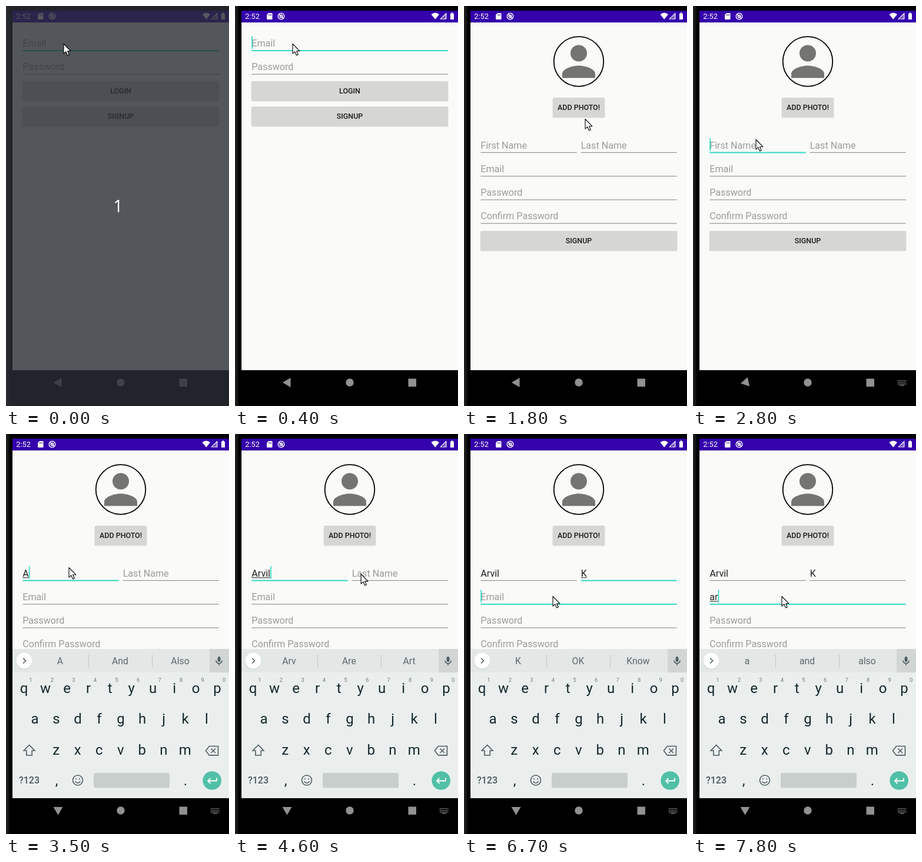
Animation of 379 by 681 pixels, one loop 8 s. Source, as an HTML page:

```html
<!DOCTYPE html>
<html lang="en">
<head>
<meta charset="utf-8">
<title>Sign-up form</title>
<style>
html, body { margin: 0; width: 100%; height: 100%; overflow: hidden; background: #000; }
svg { display: block; width: 379px; height: 681px; font-family: Roboto, "Noto Sans", sans-serif; }
.label { font-size: 12.5px; font-weight: 500; fill: #1b1c1b; text-anchor: middle; }
.field { font-size: 16.1px; }
.key { font-size: 24px; fill: #14282c; text-anchor: middle; }
.digit { font-size: 9.5px; fill: #6f7b7d; text-anchor: middle; }
.word { font-size: 15.8px; fill: #5c686b; text-anchor: middle; }
.line { fill: none; stroke: #4d5c60; stroke-width: 1.6; }
.tool { fill: none; stroke: #66716f; stroke-width: 1.6; }
</style>
</head>
<body>
<svg id="stage" viewBox="0 0 379 681">
  <defs>
    <clipPath id="screen"><rect x="11" y="8" width="368" height="673"/></clipPath>
    <clipPath id="body"><rect x="11" y="28" width="368" height="592"/></clipPath>
    <linearGradient id="edge"><stop offset="0" stop-color="#242424"/><stop offset="1" stop-color="#0b0b0b"/></linearGradient>
  </defs>
  <rect width="379" height="681"/>
  <rect width="6" height="681" fill="url(#edge)"/>
  <g clip-path="url(#screen)">
    <g id="login"></g>
    <g id="signup"></g>
  </g>
  <g clip-path="url(#body)"><g id="keyboard"></g></g>
  <g id="status" fill="#fff">
    <text x="17.3" y="22.3" font-size="12.8">2:52</text>
    <path d="M57 12h5.5q1 0 1 1v9q0 1-1 1h-7.500q-1 0-1-1v-7z"/>
    <path d="M57.500 14v2.500M59.500 14v2.500M61.500 14v2.500" stroke="#3401ac" stroke-width=".9"/>
    <g fill="none" stroke="#fff" stroke-width="1.4">
      <circle cx="78.500" cy="17.500" r="5.300"/><circle cx="78.500" cy="17.500" r="2.300"/><path d="M75 14l7 7"/>
    </g>
    <path d="M333.500 14.200Q340.300 9 347 14.200L340.300 22.800Z"/>
    <path d="M349.500 22L358.800 12.800V22Z" fill="none" stroke="#fff" stroke-width="1.2"/>
    <path d="M354 18.500L359.300 13V22.500H354Z" opacity=".35"/>
    <path d="M366 12.800h1.700v-1.500h2.600v1.500h1.700v10.200h-6z"/>
  </g>
  <g id="nav" fill="#909190">
    <path id="back" d="M80.800 641L94.500 633V649Z"/>
    <circle cx="195" cy="641" r="6.700"/>
    <rect x="294.500" y="634.500" width="13.500" height="13.500"/>
    <g id="switcher" stroke="#909190" stroke-width="1.6" stroke-dasharray="1.600 1.100">
      <path d="M348 637.800h14.500M348 640.700h14.500M348 643.600h14.500"/>
      <path d="M351.500 646h7.500" stroke-dasharray="none" stroke-width="1.200"/>
    </g>
  </g>
  <g id="pause">
    <rect width="379" height="681" fill="#2a2e35" opacity=".8"/>
    <text x="190.500" y="351" font-size="29.500" font-family="Open Sans, Noto Sans, sans-serif" fill="#fff" text-anchor="middle">1</text>
  </g>
  <path id="mouse" d="M0 0V16.600L3.800 13.200L6.500 19.400L9.200 18.200L6.600 12.200H11.800Z" fill="#fff" stroke="#000" stroke-width="1.100" stroke-linejoin="round"/>
</svg>
<script>
const LOOP = 8000, TEAL = '#2fd9c4', CENTER = [195, 344];
const $ = id => document.getElementById(id);

function add(parent, tag, attrs = {}, text) {
  const el = document.createElementNS('http://www.w3.org/2000/svg', tag);
  set(el, attrs);
  if (text !== undefined) el.textContent = text;
  return parent.appendChild(el);
}
function set(el, attrs) {
  for (const k in attrs) el.setAttribute(k, attrs[k]);
}
const show = (el, on) => el.setAttribute('display', on ? 'inline' : 'none');
const within = (t, a, b) => t >= a && t < b;

// Latest value of a list of [time, value] pairs
function at(t, list) {
  let v = list[0][1];
  for (const [start, value] of list) if (t >= start) v = value;
  return v;
}

function addWindow(g) {
  add(g, 'rect', { x: 11, y: 8, width: 368, height: 672, fill: '#fafaf8' });
  add(g, 'rect', { x: 11, y: 8, width: 368, height: 20, fill: '#3401ac' });
  add(g, 'rect', { x: 11, y: 620, width: 368, height: 61 });
}

function addButton(g, x, y, w, label) {
  add(g, 'rect', { x: x - .5, y: y + .5, width: w + 1, height: 34, rx: 2.500, fill: '#000', opacity: .13 });
  const face = add(g, 'rect', { x, y, width: w, height: 33, rx: 2, fill: '#d6d7d4' });
  add(g, 'text', { x: x + w / 2, y: y + 21, class: 'label' }, label);
  return face;
}

function addField(g, x, base, w, hint) {
  const text = add(g, 'text', { x, y: base, class: 'field' });
  const under = add(g, 'rect', { x, y: base + 1.700, height: 1, fill: '#222' });
  const line = add(g, 'rect', { x, width: w });
  const caret = add(g, 'rect', { y: base - 17.500, width: 1.700, height: 21.500, fill: TEAL });
  return (value, focus, blink, composing) => {
    text.textContent = value || hint;
    set(text, { fill: value ? '#202120' : '#9b9c9a' });
    const len = value ? text.getComputedTextLength() : 0;
    set(line, focus ? { y: base + 6, height: 2, fill: TEAL } : { y: base + 6.400, height: 1.100, fill: '#8d8e8c' });
    set(under, { width: len });
    set(caret, { x: x + len });
    show(under, value && composing);
    show(caret, blink);
  };
}

// Login window
const login = $('login');
addWindow(login);
const loginMail = addField(login, 28.300, 69, 333.500, 'Email');
addField(login, 28.300, 109.200, 333.500, 'Password')('', false, false);
addButton(login, 28, 128, 334, 'LOGIN');
const signupFace = addButton(login, 28, 171, 334, 'SIGNUP');

// Sign-up window
const signup = $('signup');
addWindow(signup);
add(signup, 'circle', { cx: 195, cy: 94.500, r: 42.300, fill: 'none', stroke: '#000', 'stroke-width': 1.800 });
add(signup, 'circle', { cx: 195, cy: 80.500, r: 14, fill: '#747473' });
add(signup, 'path', { d: 'M195 101.500c-9.300 0-28 4.700-28 14v7h56v-7c0-9.300-18.700-14-28-14z', fill: '#747473' });
addButton(signup, 151, 156, 88, 'ADD PHOTO!');
const first = addField(signup, 28.300, 242.500, 163.500, 'First Name');
const last = addField(signup, 198.700, 242.500, 163.100, 'Last Name');
const mail = addField(signup, 28.300, 282.800, 333.500, 'Email');
addField(signup, 28.300, 323, 333.500, 'Password')('', false, false);
addField(signup, 28.300, 363.200, 333.500, 'Confirm Password')('', false, false);
addButton(signup, 28, 383, 334, 'SIGNUP');

// Keyboard
const board = $('keyboard');
add(board, 'rect', { x: 11, y: 366, width: 368, height: 260, fill: '#eaefee' });
add(board, 'rect', { x: 11, y: 366, width: 368, height: 40, fill: '#e3e7e6' });
add(board, 'rect', { x: 346, y: 366, width: 33, height: 40, fill: '#d1d6d4' });
add(board, 'circle', { cx: 31, cy: 386.800, r: 13.800, fill: '#c9cecc' });
add(board, 'circle', { cx: 31, cy: 386, r: 13.500, fill: '#fff' });
const chevron = add(board, 'path', { d: 'M29 381.500l4.500 4.500-4.500 4.500', class: 'line' });
add(board, 'rect', { x: 359.700, y: 379, width: 4.800, height: 9, rx: 2.400, fill: '#4d5c60' });
add(board, 'path', { d: 'M357 385.500a5.100 5.100 0 0 0 10.200 0M362.100 390.500v3.500', class: 'line' });

const words = add(board, 'g');
for (const x of [140.500, 248.500]) add(words, 'path', { d: `M${x} 375.500v22`, stroke: '#c3c9c7' });
const slots = [92, 194, 296].map(x => add(words, 'text', { x, y: 392, class: 'word' }));

const tools = add(board, 'g');
add(tools, 'path', { d: 'M84 384.500a4.700 4.700 0 1 1-9.400 0a4.700 4.700 0 1 1 9.400 0M82.700 387.800l6 6', class: 'tool' });
add(tools, 'path', { d: 'M130.500 379.500h9q2 0 2 2v6l-5 5.500h-6q-2 0-2-2v-9.500q0-2 2-2M141.500 387.500h-5v5.500M131.500 386.500q2.500 3.500 5 1M132 383h1.500M137 383h1.500', class: 'tool' });
add(tools, 'text', { x: 188, y: 390, 'font-size': 11.500, 'font-weight': 700, fill: '#66716f', 'text-anchor': 'middle' }, 'GIF');
add(tools, 'rect', { x: 236.500, y: 379.500, width: 13.500, height: 13.500, rx: 1.500, fill: '#66716f' });
add(tools, 'path', { d: 'M276 376v20', stroke: '#c9cfcd' });
for (const x of [303.500, 309, 314.500]) add(tools, 'circle', { cx: x, cy: 386.300, r: 1.800, fill: '#66716f' });

const ROWS = [['qwertyuiop', 30.600, 440.500], ['asdfghjkl', 49, 493], ['zxcvbnm', 85.300, 545.700]];
function addLetters(upper) {
  const g = add(board, 'g');
  for (const [row, x, y] of ROWS) {
    [...row].forEach((c, i) => add(g, 'text', { x: x + i * 36.500, y: y + (upper ? 1.800 : 0), class: 'key' },
      upper ? c.toUpperCase() : c));
  }
  add(g, 'path', { d: 'M39.500 529.500l-9.300 9.500h4.600v8h9.400v-8h4.600z', class: 'line', style: upper ? 'fill:#4d5c60' : '' });
  return g;
}
const lower = addLetters(false), upper = addLetters(true);
[...'1234567890'].forEach((c, i) => add(board, 'text', { x: 41.800 + i * 36.550, y: 422, class: 'digit' }, c));
add(board, 'path', { d: 'M339.500 539.200l6-7.700h15v15.400h-15zM348.500 535.500l7.500 7.500M356 535.500l-7.500 7.500', class: 'line' });
add(board, 'text', { x: 39.500, y: 595.300, 'font-size': 16, 'font-weight': 500, fill: '#4a585c', 'text-anchor': 'middle' }, '?123');
add(board, 'text', { x: 86, y: 597.500, class: 'key' }, ',');
add(board, 'text', { x: 305, y: 597.500, class: 'key' }, '.');
add(board, 'circle', { cx: 122, cy: 589.500, r: 8.500, class: 'line' });
add(board, 'path', { d: 'M117.500 591.500q4.500 5.500 9 0M118.800 586.200v2M125.200 586.200v2', class: 'line' });
add(board, 'rect', { x: 149, y: 577, width: 129, height: 25.500, rx: 3, fill: '#c8cecc' });
add(board, 'circle', { cx: 350.200, cy: 590, r: 15.800, fill: '#50c0a6' });
add(board, 'path', { d: 'M358 585.500v5h-15M347.500 586l-4.500 4.500l4.500 4.500', fill: 'none', stroke: '#fff', 'stroke-width': 1.800 });

// Pointer moves: start, steps, x, y
const MOVES = [[0, 1, 98, 64.500], [600, 5, 206, 192.500], [2100, 3, 107, 227.500], [4400, 4, 234, 240.500], [6200, 4, 151, 276.500]];
function pointer(t) {
  let x = 98, y = 64.500;
  for (const [start, steps, tx, ty] of MOVES) {
    if (t < start) break;
    const k = Math.min(1, ((t - start) / 100 + 1) / steps), e = k * k * (3 - 2 * k);
    x += (tx - x) * e;
    y += (ty - y) * e;
  }
  return [x, y];
}

function zoom(el, s) {
  const [x, y] = CENTER;
  set(el, { transform: `translate(${x} ${y}) scale(${s}) translate(${-x} ${-y})` });
}

function drawWindows(t) {
  const p = t >= 1800 ? 1 : t >= 1500 ? 1 - .32 * Math.exp((1500 - t) / 80) : 0;
  show(login, t < 1800);
  show(signup, t >= 1500);
  zoom(login, 1 + .05 * p);
  zoom(signup, .85 + .15 * p);
  set(signup, { opacity: t < 1600 ? .72 : 1 });
  set(signupFace, { fill: within(t, 1300, 1500) ? '#c6c7c4' : '#d6d7d4' });
  loginMail('', true, within(t, 400, 900));
}

function drawFields(t) {
  first(at(t, [[0, ''], [3200, 'A'], [3700, 'Ar'], [3900, 'Arv'], [4400, 'Arvi'], [4500, 'Arvil']]),
    within(t, 2700, 5200), within(t, 2700, 5000), within(t, 3500, 5200));
  last(t < 6000 ? '' : 'K', within(t, 5200, 6900), within(t, 5200, 6500), within(t, 6000, 6900));
  mail(at(t, [[0, ''], [7400, 'a'], [7800, 'ar']]), t >= 6700, t >= 6700, true);
}

function drawKeyboard(t) {
  const slide = at(t, [[0, 260], [2900, 130], [3000, 36], [3100, 6], [3200, 0]]);
  show(board, t >= 2900);
  set(board, { transform: `translate(0 ${slide})` });
  const caps = t < 3200 || within(t, 5700, 6000);
  show(upper, caps);
  show(lower, !caps);
  const list = at(t, [[0, ''], [3500, 'A And Also'], [3800, 'Ar Are Art'], [3900, 'Arv Are Art'], [5300, ''],
    [6000, 'K OK Know'], [7000, ''], [7700, 'a and also']]);
  show(words, list);
  show(tools, !list);
  list.split(' ').forEach((w, i) => slots[i].textContent = w);
  set(chevron, { transform: list ? '' : 'rotate(180 31 386)' });
  const turn = at(t, [[0, 0], [2800, -12], [2900, -55], [3000, -82], [3100, -90]]);
  set($('back'), { transform: `rotate(${turn} 88.500 641)` });
  show($('switcher'), t >= 2800);
}

function draw(time) {
  const t = Math.floor(time / 100) * 100;
  drawWindows(t);
  drawFields(t);
  drawKeyboard(t);
  show($('pause'), t < 400);
  set($('mouse'), { transform: `translate(${pointer(t)})` });
}

function tick(now) {
  draw(now % LOOP);
  requestAnimationFrame(tick);
}
draw(0);
requestAnimationFrame(tick);
</script>
</body>
</html>
```
